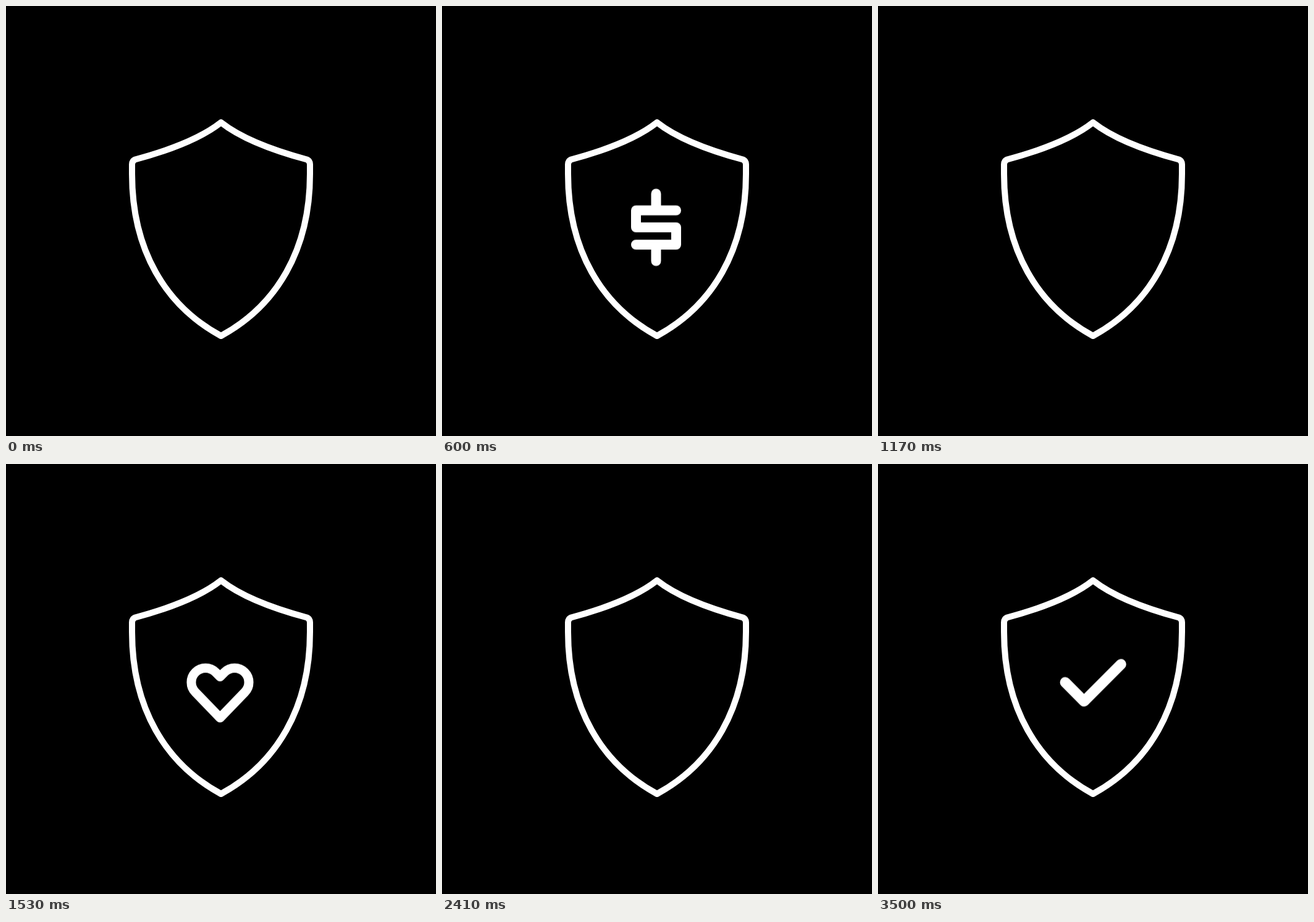
An HTML page for the animation above (3.56 s loop, 696 by 696 pixels).

```html
<!DOCTYPE html>
<html lang="en">
<head>
<meta charset="utf-8">
<title>Shield</title>
<style>
  html, body { margin: 0; height: 100%; overflow: hidden; background: #000; }
  svg { display: block; width: 100vw; height: 100vh; }
  path { fill: none; stroke: #fff; stroke-linecap: round; stroke-linejoin: round; }
  .shield { stroke-width: 10; }
  .icon { visibility: hidden; }
  #dollar { stroke-width: 16; }
  #heart { stroke-width: 15; }
  #check { stroke-width: 17; }
</style>
</head>
<body>
<svg viewBox="0 0 696 696">
  <path class="shield" d="M348 188.500C313 216 263 234 209 248.500Q204 250.500 204 257V272C204 395 258 485 348 534C438 485 492 395 492 272V257Q492 250.500 487 248.500C433 234 383 216 348 188.500Z"/>
  <path class="icon" id="dollar" d="M379 330.500H314V358H379V386H314M346.500 303.500V330.500M346.500 386V412.500"/>
  <path class="icon" id="heart" d="M346.500 329.400L339.300 322.200A23 23 0 1 0 306.700 354.800L346.500 396L386.300 354.800A23 23 0 1 0 353.700 322.200Z"/>
  <path class="icon" id="check" d="M303 354.800L333.500 385.500L393.300 325.500"/>
</svg>
<script>
  const LOOP = 3560, STEP = 30;

  // Times in ms: rise into place, start of exit, exit length, disappearance.
  const icons = [
    { id: 'dollar', enter: 180, leave: 690, exit: 420, hide: 1170 },
    { id: 'heart', enter: 1467, leave: 1980, exit: 370, hide: 2405 },
    { id: 'check', enter: 2780, leave: 3290, exit: 420, hide: LOOP }
  ];

  function slide(el, from, to, delay, duration, easing, fill) {
    const frames = [from, to].map(y => ({ transform: `translateY(${y}px)` }));
    const anim = el.animate(frames, { delay, duration, easing, fill });
    anim.pause();
    return anim;
  }

  for (const icon of icons) {
    const el = icon.el = document.getElementById(icon.id);
    icon.moves = [
      slide(el, 30, 0, icon.enter, 510, 'cubic-bezier(.05,.65,.38,1)', 'both'),
      slide(el, 0, -28, icon.leave, icon.exit, 'cubic-bezier(.57,0,.765,0)', 'forwards')
    ];
  }

  // Motion advances in held steps, regrouped after the heart leaves.
  function held(t) {
    const base = t < 2410 ? 0 : t < 2780 ? 2410 : 2780;
    return base + Math.floor((t - base) / STEP) * STEP;
  }

  const start = performance.now();

  function draw() {
    const t = held((performance.now() - start) % LOOP);
    for (const { el, moves, enter, hide } of icons) {
      el.style.visibility = t >= enter && t < hide ? 'visible' : 'hidden';
      for (const move of moves) move.currentTime = t;
    }
    requestAnimationFrame(draw);
  }
  draw();
</script>
</body>
</html>
```
